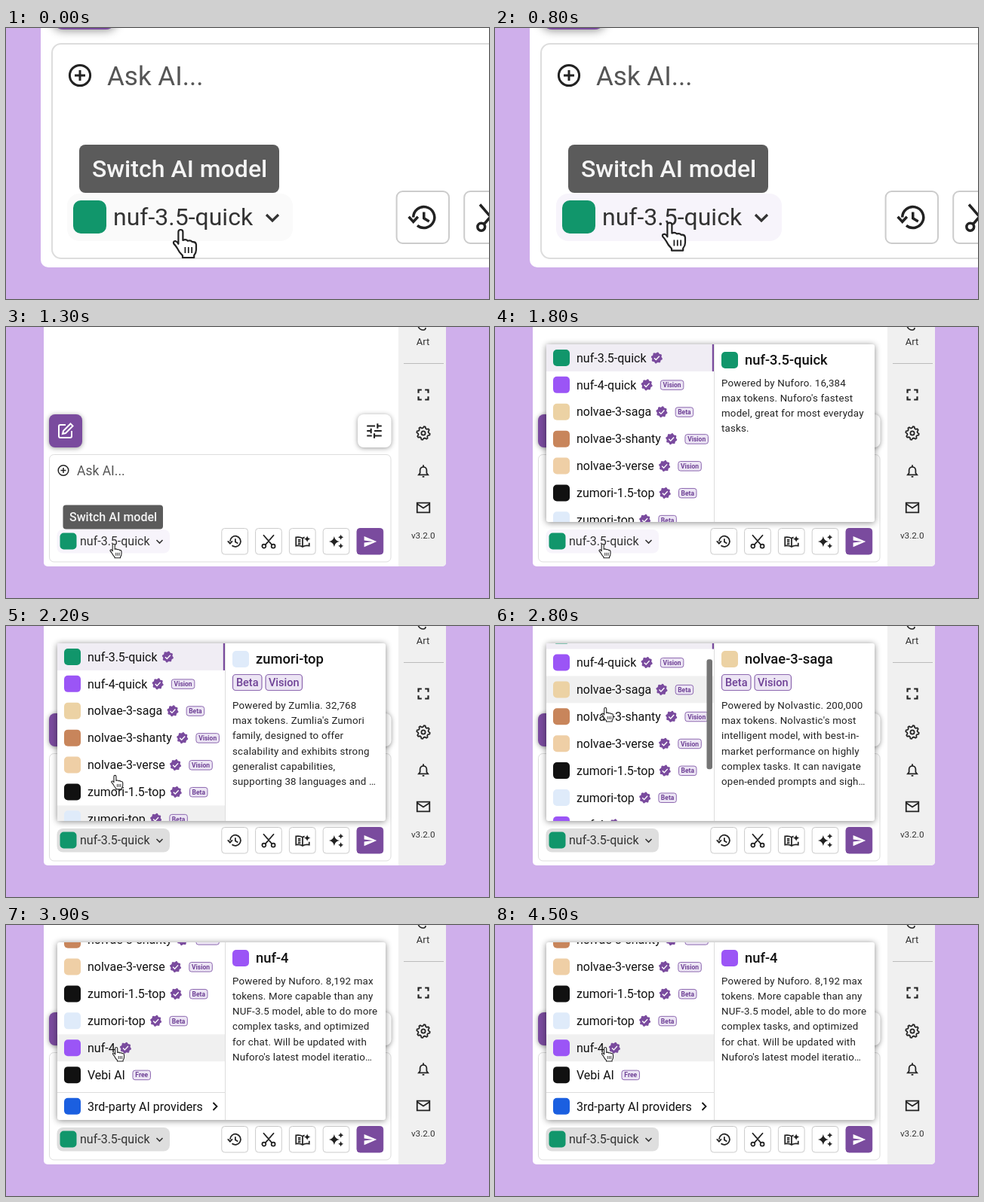
These frames come from a looping animation (640 px wide and 360 px high, 4.6 s). An HTML page:

```html
<!DOCTYPE html>
<html lang="en">
<head>
<meta charset="utf-8">
<title>Model switcher</title>
<style>
  html, body { margin: 0; width: 100%; height: 100%; overflow: hidden; background: #cfafeb; }
  svg { display: block; font-family: Roboto, Arial, sans-serif; font-size: 16px; }
  .soft { filter: drop-shadow(0 1px 3px #0006); }
  .deep { filter: drop-shadow(0 1px 4px #0007); }
  .about { font-size: 13.3px; letter-spacing: .2px; }
</style>
</head>
<body>
<svg id="stage" width="640" height="360" viewBox="0 0 640 360"></svg>
<script>
const PURPLE = '#7a4b9e', INK = '#222';
const TOP = 23, ROW = 35.9, SCROLL = 129, LOOP = 4600, STEP = 100;

// name, icon colour, list tag, detail tags, description
const models = [
  ['nuf-3.5-quick', '#11966b', '', '', "Powered by Nuforo. 16,384|max tokens. Nuforo's fastest|model, great for most everyday|tasks."],
  ['nuf-4-quick', '#9b55f6', 'Vision', 'Vision', 'Powered by Nuforo. 128,000|max tokens. A faster model|with vision capabilities.'],
  ['nolvae-3-saga', '#ecd2a4', 'Beta', 'Beta Vision', "Powered by Nolvastic. 200,000|max tokens. Nolvastic's most|intelligent model, with best-in-|market performance on highly|complex tasks. It can navigate|open-ended prompts and sigh…"],
  ['nolvae-3-shanty', '#c8855b', 'Vision', 'Beta Vision', 'Powered by Nolvastic. 200,000|max tokens. A balance between|intelligence and speed, made|for everyday work and large|deployments.'],
  ['nolvae-3-verse', '#efcfa6', 'Vision', 'Beta Vision', "Powered by Nolvastic. 200,000|max tokens. Nolvastic's fastest|and most compact model, for|near-instant responses."],
  ['zumori-1.5-top', '#111', 'Beta', 'Beta Vision', "Powered by Zumlia. 1,048,576|max tokens. Zumlia's next-|generation model, with a long|context window."],
  ['zumori-top', '#dfebfa', 'Beta', 'Beta Vision', "Powered by Zumlia. 32,768|max tokens. Zumlia's Zumori|family, designed to offer|scalability and exhibits strong|generalist capabilities,|supporting 38 languages and …"],
  ['nuf-4', '#9b55f6', '', '', "Powered by Nuforo. 8,192 max|tokens. More capable than any|NUF-3.5 model, able to do more|complex tasks, and optimized|for chat. Will be updated with|Nuforo's latest model iteratio…"],
  ['Vebi AI', '#111', 'Free']
];

const rect = (x, y, w, h, r, fill, more = '') =>
  `<rect x="${x}" y="${y}" width="${w}" height="${h}" rx="${r}" fill="${fill}" ${more}/>`;
const text = (x, y, s, fill = INK, more = '') => `<text x="${x}" y="${y}" fill="${fill}" ${more}>${s}</text>`;
const line = (d, stroke, width = 1) => `<path d="${d}" fill="none" stroke="${stroke}" stroke-width="${width}"/>`;
const logo = (cx, cy, fill) => rect(cx - 11, cy - 11, 22, 22, 5, fill);

// 24-unit icon, outlined or filled, centred on a point
const icon = (d, cx, cy, size, color = INK, solid = false) =>
  `<path d="${d}" transform="translate(${cx - size / 2} ${cy - size / 2}) scale(${size / 24})" ` +
  (solid ? `fill="${color}"/>` : `fill="none" stroke="${color}" stroke-width="2"/>`);

function cog(teeth, outer, inner) {
  const pts = Array.from({ length: teeth * 4 }, (_, i) => {
    const a = (i + .5) * Math.PI / teeth / 2, r = i % 4 < 2 ? outer : inner;
    return (12 + r * Math.cos(a)).toFixed(2) + ' ' + (12 + r * Math.sin(a)).toFixed(2);
  });
  return 'M' + pts.join('L') + 'z';
}

const spark = (x, y, r) => {
  const k = r * .15, m = r - k;
  return `M${x} ${y - r}q${k} ${m} ${r} ${r}q${-m} ${k} ${-r} ${r}q${-k} ${-m} ${-r} ${-r}q${m} ${-k} ${r} ${-r}z`;
};

const ring = (x, y, r) => `M${x - r} ${y}a${r} ${r} 0 1 0 ${2 * r} 0a${r} ${r} 0 1 0 ${-2 * r} 0`;

const toolbar = [
  icon('M8 18.2A8 8 0 1 0 5 12M1.5 11.5 5 15.3l3.5-3.8M13 8v4.7l4 2.4', 303, 284.8, 21),
  icon('M4 2 17 17M20 2 7 17' + ring(5, 19, 2.8) + ring(19, 19, 2.8), 348, 285, 21),
  icon('M12 7Q8 4.5 2 5.5v13q6-1 10 1.5 4-2.500 10-1.5V14M12 7v13M5 9.5h4M5 12.5h4M5 15.5h4M12 7l3-1.5', 393, 285, 21) +
    icon(spark(19, 8, 5), 393, 285, 21, INK, true),
  icon(spark(9, 12, 8) + spark(19, 5.5, 4) + spark(19, 18.5, 4), 437.5, 285, 21, INK, true),
  icon('M2 21 23 12 2 3v7l15 2-15 2z', 482.5, 285, 19, '#fff', true)
];

const sidebar =
  `<path d="M520 -20h63v333a5 5 0 0 1-5 5h-58z" fill="#f0f0f0"/>` +
  line('M546 -1q2 5 7 5 3 0 3-3', INK, 1.6) +
  text(552.5, 23.7, 'Art', '#333', 'text-anchor="middle" font-size="13"') +
  line('M527 48.5h53', '#bbb') +
  icon('M6 10V6h4M14 6h4v4M18 14v4h-4M10 18H6v-4', 553, 90, 26) +
  icon(cog(8, 10, 7.8) + ring(12, 12, 3), 553, 141, 21) +
  icon('M5 18h14l-2-2.5V11a5 5 0 0 0-10 0v4.500zM12 3v3M10.5 21h3', 553, 191, 21) +
  icon('M3 5h18v14H3zM3 6.5l9 6 9-6', 553, 240, 22) +
  text(552.7, 281.3, 'v3.2.0', '#333', 'text-anchor="middle" font-size="11.7"');

const card =
  rect(50, -20, 533, 338, 5, '#fff') + sidebar +
  `<g class="soft">${rect(57, 116, 44, 44, 8, PURPLE)}${rect(466, 116, 44.5, 44, 8, '#fff')}</g>` +
  icon('M12 4H5a2 2 0 0 0-2 2v13a2 2 0 0 0 2 2h13a2 2 0 0 0 2-2v-7M18.5 2.5l3 3L12 15l-4 1 1-4z', 79, 138, 24, '#fff') +
  icon('M3 6h10M17 6h4M16 3v6M3 12h5M8 9v6M12 12h9M3 18h6M13 18h8M12 15v6', 488, 138, 26) +
  rect(57.5, 169.5, 452.5, 142.5, 6, '#fff', 'stroke="#ddd"') +
  line(ring(76, 190.5, 6.8) + 'M72.5 190.5h7M76 187v7', INK, 1.5) +
  text(94, 196.8, 'Ask AI...', '#555', 'font-size="17.5"') +
  rect(67.5, 269, 149.5, 31.5, 8, '#f7f4fb', 'id="picker"') +
  logo(82.5, 284.5, models[0][1]) +
  text(98, 290.2, models[0][0], '#333') +
  line('M199.5 283l4 4 4-4', '#333', 1.6) +
  toolbar.map((art, i) => {
    const last = i == 4;
    return rect(285.8 + 44.8 * i, 267.5, 34.7, 34.5, 4, last ? PURPLE : '#fff', `stroke="${last ? PURPLE : '#ccc'}"`) + art;
  }).join('') +
  `<g id="tip">${rect(75.5, 236.5, 132.5, 32, 4, '#5b5b5b')}${text(84, 258, 'Switch AI model', '#f4f4f4', 'font-weight="500"')}</g>`;

const row = ([name, color], i) => {
  const y = TOP + ROW * (i + .5);
  return logo(88, y, color) + text(108, y + 5.7, name, '#111', 'class="name"');
};

const popup =
  `<g id="popup"><g class="deep">${rect(68, TOP, 435, 236, 3, '#fff')}</g>
  <clipPath id="view"><rect x="68" y="${TOP}" width="222" height="236"/></clipPath>
  <g clip-path="url(#view)"><g id="list">` +
  rect(68, TOP, 222, ROW, 0, '#f0edf4') + rect(68, TOP, 222, ROW, 0, '#f0f0f0', 'id="hover"') +
  rect(287.8, TOP, 2.2, ROW, 0, PURPLE) +
  models.map(row).join('') +
  line('M68 351.5h222', '#ddd') + logo(88, 369.8, '#1b5fe0') +
  text(108, 375.5, '3rd-party AI providers', '#111') + line('M274.5 365l5 5-5 5', '#111', 1.8) +
  `</g>${rect(280.5, 26, 7.5, 146, 3, '#757575', 'id="thumb"')}</g>
  ${line('M290.5 23v236', '#ddd')}<g id="detail"></g></g>`;

const hand =
  `<g id="cursor"><path fill="#fff" stroke="#222" stroke-width="1.1" stroke-linejoin="round"
  d="M-1.5 1.5a1.5 1.5 0 0 1 3 0v5.5q2-1 3.2.4 2-.6 3 .7 2.3-.3 2.6 1.7v3.5q0 2-1.4 3.7v1.5h-7.6v-1.3q-2.5-2.5-3.6-5-1.3-2-2.3-3-.6-1.7 1.4-1.6 1 .3 1.7 1.8z"/>
  ${line('M3 11.5v4M5.2 11.5v4M7.4 11.5v4', '#222', .9)}</g>`;

const $ = id => document.getElementById(id);
$('stage').innerHTML = `<g id="camera">${card}${popup}${hand}</g>`;

const chip = (x, y, w, h, r, size, label) =>
  rect(x, y, w, h, r, '#ece5f4', `stroke="#8d68b0" stroke-width="${size > 10 ? 1.2 : 1}"`) +
  text(x + w / 2, y + h / 2 + size * .36, label, '#6f4296', `text-anchor="middle" font-weight="${size > 10 ? 500 : 700}" font-size="${size}"`);

// Badges and tags follow the measured end of each name
document.querySelectorAll('.name').forEach((el, i) => {
  const end = 108 + el.getComputedTextLength(), y = TOP + ROW * (i + .5), tag = models[i][2];
  const verified = i < 8;
  let extra = '';
  if (verified) extra += icon(cog(8, 11, 9.3), end + 13.8, y, 16.5, PURPLE, true) +
    icon('M7 12.3l3.5 3.5 6.5-7', end + 13.8, y, 16.5, '#fff');
  if (tag) extra += chip(end + (verified ? 32 : 10), y - 6, tag == 'Vision' ? 30.5 : 23.5, 12.5, 3, 8.5, tag);
  el.insertAdjacentHTML('afterend', extra);
});

let shown = -1;
function showDetail(i) {
  if (i == shown) return;
  shown = i;
  const [name, color, , tags, about] = models[i];
  let x = 300.5;
  const chips = tags.split(' ').filter(Boolean).map(tag => {
    const w = tag == 'Vision' ? 48.5 : 38.5, out = chip(x, 64.5, w, 21, 4, 14.5, tag);
    x += w + 5;
    return out;
  });
  const first = tags ? 110 : 78.8;
  $('detail').innerHTML = logo(311, 44, color) + text(331, 50, name, '#111', 'font-weight="500" font-size="18.4"') +
    chips.join('') + about.split('|').map((s, n) => text(300, first + 20.2 * n, s, INK, 'class="about"')).join('');
}

const ramp = (t, a, b) => Math.min(1, Math.max(0, (t - a) / (b - a)));
const ease = (t, a, b) => { const u = ramp(t, a, b); return u * u * (3 - 2 * u); };

const scrollAt = t => SCROLL * ease(t, 2700, 3030);
const cursorY = t => 293 - 4.7 * ease(t, 200, 700) - 179.8 * ease(t, 1900, 2500) + 54 * ease(t, 3100, 3560);

function hoveredAt(t) {
  const y = cursorY(t);
  return y < 259 ? Math.floor((y - TOP + scrollAt(t)) / ROW) : -1;
}

function draw(t) {
  const zoom = 2 - ramp(t, 800, 1000), y = cursorY(t), scroll = scrollAt(t);
  const hover = hoveredAt(t - STEP);   // highlight trails the pointer by one step
  $('camera').setAttribute('transform', `translate(54 318) scale(${zoom}) translate(-54 -318)`);
  $('cursor').setAttribute('transform', `translate(${142.7 + 3.5 * ease(t, 1900, 2500)} ${y})`);
  $('picker').setAttribute('fill', y < 269 ? '#dedede' : t < 300 ? '#fafafa' : '#f7f4fb');
  $('tip').setAttribute('opacity', t < 1400 ? 1 : 0);
  $('popup').setAttribute('opacity', ramp(t, 1300, 1500));
  $('list').setAttribute('transform', `translate(0 ${-scroll})`);
  $('thumb').setAttribute('y', 26 + scroll * .64);
  $('thumb').setAttribute('opacity', t >= 2700 && t < 3300 ? 1 : 0);
  $('hover').setAttribute('y', TOP + ROW * hover);
  $('hover').setAttribute('opacity', hover > 0 ? 1 : 0);
  showDetail(Math.max(0, hover));
}

const start = performance.now();
function tick() {
  const t = (performance.now() - start) % LOOP;
  draw(Math.floor(t / STEP) * STEP);
  requestAnimationFrame(tick);
}
tick();
</script>
</body>
</html>
```
